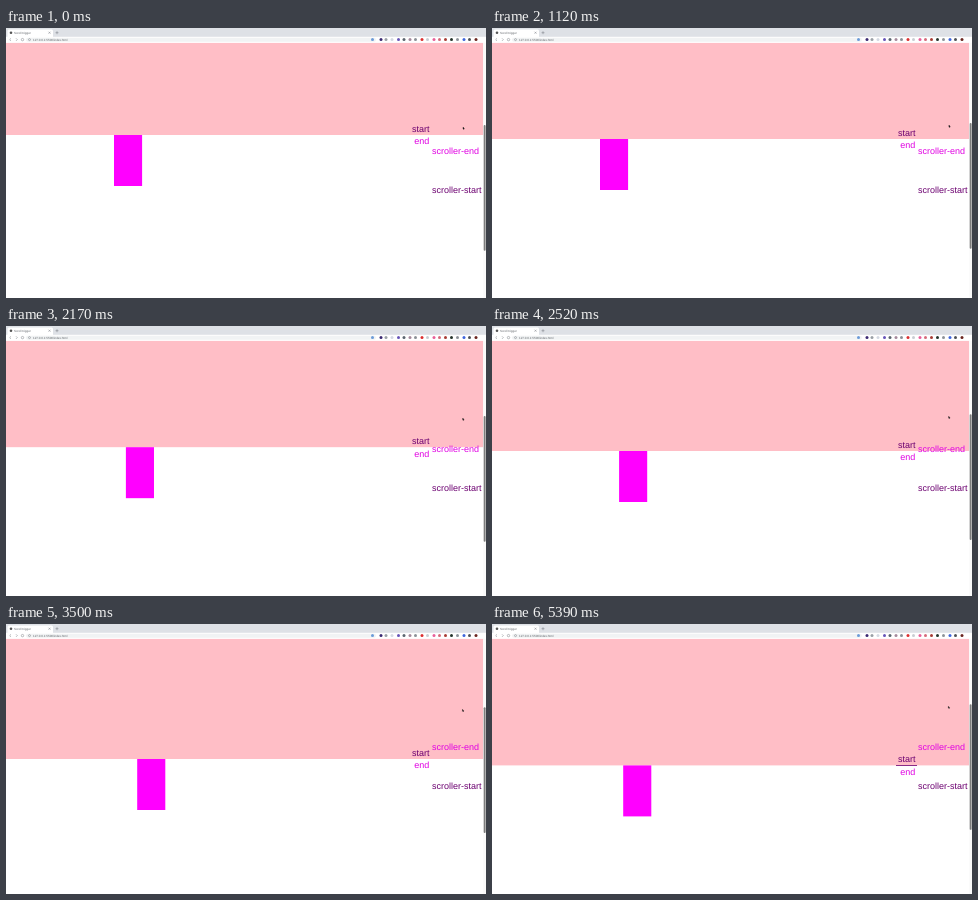
An HTML page that plays this animation: 480 by 270 pixels, repeating every 5810 ms.

```html
<!DOCTYPE html>
<html lang="en">
<head>
<meta charset="utf-8">
<title>Scroll markers</title>
<style>
  html, body { margin: 0; width: 100%; height: 100%; overflow: hidden; background: #fff; }
  svg { display: block; width: 480px; height: 270px; }
  text { font: 9px "Liberation Sans", Arial, sans-serif; text-rendering: geometricPrecision; }
  .start { fill: #6c0070; }
  .end { fill: #e000e2; }
  .right { text-anchor: end; }
  .tiny { font-size: 3px; fill: #5f6368; }
  .thin { fill: none; stroke: #777b80; stroke-width: .5; }
</style>
</head>
<body>
<svg viewBox="0 0 480 270">
  <rect width="480" height="270" fill="#fff"/>

  <rect id="panel" y="14.7" width="477.2" fill="#ffbec6"/>
  <rect id="box" width="28.1" height="51" fill="#f0f"/>

  <g id="markers">
    <text class="start right" x="423.4" y="-3">start</text>
    <text class="end right" x="423.4" y="9.4">end</text>
  </g>
  <rect id="rule" x="404" width="21" height="1" fill="#6c0070"/>
  <text class="end" x="426" y="126">scroller-end</text>
  <text class="start" x="426" y="165.2">scroller-start</text>

  <rect x="477.2" y="14.7" width="2.8" height="255.3" fill="#fafafa"/>
  <rect id="thumb" x="477.7" width="1.9" height="125.7" rx=".9" fill="#7c7c7c"/>

  <rect width="480" height="9" fill="#dee1e6"/>
  <path d="M1.5 9V3q0-1.500 1.500-1.500H45.500q1.500 0 1.500 1.500V9Z" fill="#fff"/>
  <rect y="8.800" width="480" height="5.900" fill="#fff"/>
  <rect x="20" y="9.800" width="350" height="3.900" rx="1.950" fill="#f1f3f4"/>
  <circle cx="5" cy="4.700" r="1.300" fill="#555"/>
  <text class="tiny" x="8" y="5.800">Scroll trigger</text>
  <path class="thin" d="M42.500 3.700l2 2m0-2l-2 2M49.500 4.700h3m-1.500-1.500v3"/>
  <path class="thin" d="M5 10.300l-1.300 1.300 1.300 1.300M10 10.300l1.300 1.300-1.300 1.300"/>
  <circle class="thin" cx="16.500" cy="11.600" r="1.200"/>
  <circle class="thin" cx="23.500" cy="11.600" r="1"/>
  <text class="tiny" x="27" y="12.700">127.0.0.1:5500/index.html</text>
  <g id="icons"></g>

  <path id="cursor" d="M0 0L1.400 1.500H.8L1.100 2.200.6 2.400.3 1.700 0 2Z" fill="#111" stroke="#111" stroke-width=".3"/>
</svg>
<script>
  const LOOP = 5810, STEP = 70;
  const $ = id => document.getElementById(id);
  const set = (id, attrs) => {
    for (const key in attrs) $(id).setAttribute(key, attrs[key]);
  };

  // Toolbar buttons: centre x, colour
  const icons = [
    [366.5, '#6b9bd8'], [375, '#3b2a72'], [380, '#9aa0a6'], [386, '#d4d9e2'],
    [392.5, '#6654b8'], [398, '#5c6670'], [404, '#a58a9c'], [409.5, '#8b9096'],
    [416, '#dc3030'], [421.5, '#c9cdd2'], [428, '#e8609a'], [433.5, '#d66a7a'],
    [439.5, '#a83c34'], [445.5, '#26352c'], [451.5, '#8d9399'], [458, '#3f66dc'],
    [463.5, '#4d5156'], [470, '#6b2620']
  ];
  $('icons').innerHTML = icons.map(([x, fill]) =>
    `<circle cx="${x}" cy="11.600" r="1.500" fill="${fill}"/>`).join('');

  // Lower edge of the panel while the page scrolls: time, y
  const scroll = [
    [0, 107], [420, 107], [1120, 111], [1750, 116.6], [2520, 125],
    [3010, 130.4], [3500, 135], [4340, 141], [4410, 141], [4620, 141.4], [LOOP, 141.4]
  ];

  function edgeAt(t) {
    const i = scroll.findIndex(([time]) => time > t);
    const [t0, y0] = scroll[i - 1], [t1, y1] = scroll[i];
    return y0 + (y1 - y0) * (t - t0) / (t1 - t0);
  }

  // The box resumes an ease-out slide once the end marker passes
  function boxX(t) {
    const left = 1 - Math.min(1, Math.max(0, (t - 1790) / 1260));
    return 131.2 - 23.2 * left * left;
  }

  function draw(t) {
    const y = edgeAt(t);
    const top = 97 - (y - 107) * 0.49;
    const part = y % 1;
    set('panel', { height: y - 14.7 });
    set('box', { x: boxX(t), y });
    set('markers', { transform: `translate(0 ${y})` });
    // The hairline only shows between whole pixels
    set('rule', { y: Math.floor(y), opacity: part > 0.35 && part < 0.65 ? 0.8 : 0 });
    set('thumb', { y: top });
    set('cursor', { transform: `translate(${457 - (y - 107) * 0.02} ${top + 2})` });
  }

  const origin = performance.now();
  function tick() {
    const t = (performance.now() - origin) % LOOP;
    draw(Math.floor(t / STEP) * STEP);
    requestAnimationFrame(tick);
  }
  tick();
</script>
</body>
</html>
```
